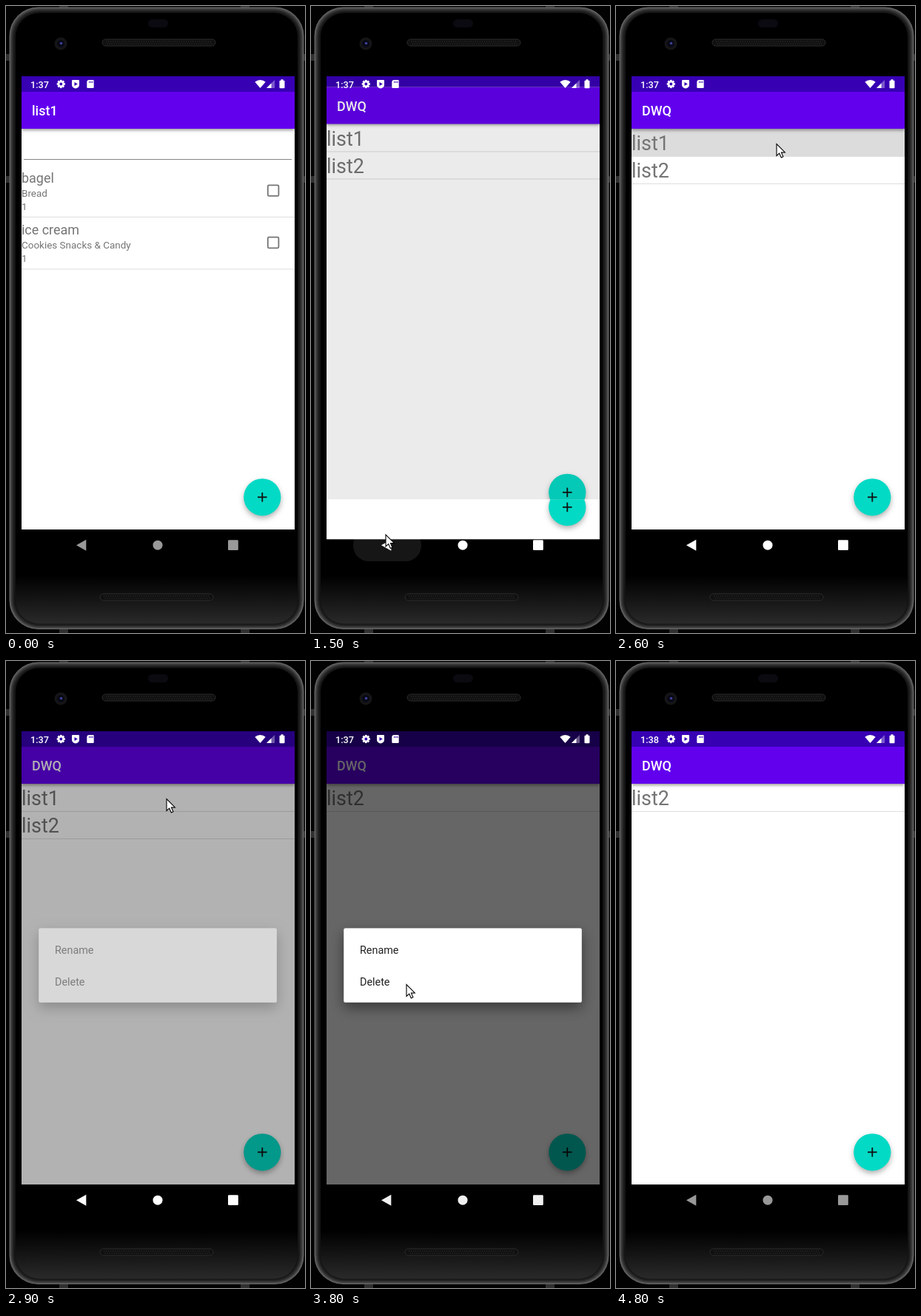
Animation of 404x848 px, one loop 5 s. Source, as an HTML page with a canvas:

```html
<!DOCTYPE html>
<html lang="en">
<head>
<meta charset="utf-8">
<title>Shopping list app</title>
<style>
  html, body { margin: 0; width: 100%; height: 100%; overflow: hidden; background: #000; }
  canvas { display: block; width: 404px; height: 848px; }
</style>
</head>
<body>
<canvas id="stage"></canvas>
<script>
const LOOP = 5000, STEP = 100;
const LEFT = 21, TOP = 95, WIDTH = 369, HEIGHT = 613;
const BAR_TOP = 116, BAR_BOTTOM = 166, ROW = 37;
const DP = WIDTH / 411;
const GREY = '#757575', LINE = '#dedede', STATUS_BLUE = '#3700b3';
const APP_NAME = 'DWQ';

const canvas = document.getElementById('stage');
const ctx = canvas.getContext('2d');
const dpr = window.devicePixelRatio || 1;
canvas.width = 404 * dpr;
canvas.height = 848 * dpr;

const ramp = (t, from, to) => Math.min(1, Math.max(0, (t - from) / (to - from)));
const smooth = u => u * u * (3 - 2 * u);
const grey = level => `rgb(${level},${level},${level})`;

function paint(fill, stroke, width = 1) {
  if (fill) { ctx.fillStyle = fill; ctx.fill(); }
  if (stroke) { ctx.strokeStyle = stroke; ctx.lineWidth = width; ctx.stroke(); }
}

function rect(x, y, w, h, color) {
  ctx.fillStyle = color;
  ctx.fillRect(x, y, w, h);
}

function roundRect(x, y, w, h, r, ...style) {
  ctx.beginPath();
  ctx.roundRect(x, y, w, h, r);
  paint(...style);
}

function circle(x, y, r, ...style) {
  ctx.beginPath();
  ctx.arc(x, y, r, 0, 2 * Math.PI);
  paint(...style);
}

function shape(points, ...style) {
  ctx.beginPath();
  points.forEach(([x, y]) => ctx.lineTo(x, y));
  ctx.closePath();
  paint(...style);
}

function text(str, x, y, sp, color, weight = 400) {
  ctx.font = `${weight} ${sp * DP}px Roboto, sans-serif`;
  ctx.fillStyle = color;
  ctx.fillText(str, x, y);
}

// Runs draw with saved state, optionally clipped to a box, moved down or faded.
function layer(draw, { clip, dy = 0, alpha = 1 } = {}) {
  ctx.save();
  if (clip) {
    ctx.beginPath();
    ctx.rect(...clip);
    ctx.clip();
  }
  ctx.translate(0, dy);
  ctx.globalAlpha = alpha;
  draw();
  ctx.restore();
}

function withShadow(opacity, blur, offset, draw) {
  ctx.save();
  ctx.shadowColor = `rgba(0,0,0,${opacity})`;
  ctx.shadowBlur = blur * dpr;
  ctx.shadowOffsetY = offset * dpr;
  draw();
  ctx.restore();
}

function speaker(x, y) {
  roundRect(x, y, 153, 9, 4.5, '#101010', '#2c2c2c');
  for (let i = 0; i < 96; i++) rect(x + 5 + i * 1.5, y + 2.5 + (i % 2) * 3, 1.2, 1.2, '#303030');
}

function drawPhone() {
  rect(0, 0, 404, 848, '#020203');
  for (const y of [65, 230]) rect(0, y, 404, 9, '#303030');
  for (const x of [72, 317]) rect(x, 0, 12, 848, '#303030');

  // The rim fades inward; the glass catches some light near the bottom.
  const rim = 11;
  for (let i = 0; i < rim; i++) {
    const shade = grey(Math.round(18 + 85 * (1 - i / rim) ** 2));
    roundRect(4.5 + i * 0.8, 1.5 + i * 0.8, 398 - i * 1.6, 841.5 - i * 1.6, 39 - i * 0.6, shade);
  }
  const glass = ctx.createLinearGradient(0, 770, 0, 836);
  glass.addColorStop(0, '#000');
  glass.addColorStop(1, '#2a2a2a');
  roundRect(13, 9.5, 381, 826, 32, glass);

  speaker(130, 45);
  speaker(127, 795);
  roundRect(192, 18, 27, 11, 5.5, '#0b0a11');
  circle(74, 51, 8.5, '#151517');
  circle(74, 51, 5, '#090916');
  circle(74.5, 50.5, 1.8, '#3a4296');
}

function statusIcons(time) {
  const middle = 105.5;
  text(time, 33, 110.5, 14.2, '#fff', 500);

  for (let i = 0; i < 4; i++) {
    ctx.save();
    ctx.translate(74.3, middle);
    ctx.rotate(i * Math.PI / 4);
    rect(-1.3, -5.6, 2.6, 11.2, '#fff');
    ctx.restore();
  }
  circle(74.3, middle, 4.2, '#fff');
  circle(74.3, middle, 1.9, STATUS_BLUE);

  roundRect(89, middle - 5.5, 10, 11.5, [1, 1, 5, 5], '#fff');
  shape([[92.5, 103], [96.8, middle], [92.5, 108]], STATUS_BLUE);

  roundRect(109.3, 100, 9.4, 11, [3, 1, 1, 1], '#fff');
  for (let i = 0; i < 3; i++) rect(112.2 + i * 2.1, 101.7, 1, 2.3, STATUS_BLUE);

  ctx.beginPath();
  ctx.moveTo(343.5, 111);
  ctx.arc(343.5, 111, 11, -2.28, -0.86);
  ctx.closePath();
  paint('#fff');

  const signal = size => [[352, 111], [352 + size, 111 - size], [352 + size, 111]];
  shape(signal(11), 'rgba(255,255,255,.35)');
  shape(signal(6.5), '#fff');
  roundRect(369.5, 100.8, 7, 10.4, 1, '#fff');
  rect(371.5, 99.3, 3, 2, '#fff');
}

function appWindow(title, body) {
  rect(LEFT, TOP, WIDTH, HEIGHT, '#fff');
  body();
  withShadow(0.4, 4, 1.5, () => rect(LEFT, BAR_TOP, WIDTH, BAR_BOTTOM - BAR_TOP, '#6200ee'));
  rect(LEFT, TOP, WIDTH, BAR_TOP - TOP, STATUS_BLUE);
  text(title, 35, 148, 20, '#fff', 500);

  const x = 346.3, y = 664.3, arm = 7 * DP;
  withShadow(0.3, 7, 3.5, () => circle(x, y, 28 * DP, '#03dac5'));
  rect(x - arm, y - DP, 2 * arm, 2 * DP, '#111');
  rect(x - DP, y - arm, 2 * DP, 2 * arm, '#111');
}

function groceryRow(name, category, y) {
  text(name, LEFT, y, 20, GREY);
  text(category, LEFT, y + 19, 15, GREY);
  text('1', LEFT, y + 37, 15, GREY);
  roundRect(353.8, y + 3.3, 14.6, 14.6, 1.5, null, GREY, 1.8);
  rect(LEFT, y + 46, WIDTH, 1, LINE);
}

function drawGroceries() {
  appWindow('list1', () => {
    rect(24, 207, 362, 1, '#858585');
    groceryRow('bagel', 'Bread', 239);
    groceryRow('ice cream', 'Cookies Snacks & Candy', 309.4);
  });
}

function drawLists(names, press) {
  appWindow(APP_NAME, () => {
    layer(() => circle(220, 187, 260 * press, '#dcdcdc'), { clip: [LEFT, BAR_BOTTOM, WIDTH, ROW + 0.5] });
    names.forEach((name, i) => {
      const y = BAR_BOTTOM + i * ROW;
      text(name, LEFT, y + 29, 30, GREY);
      rect(LEFT, y + ROW, WIDTH, 1, LINE);
    });
  });
}

function drawNav(t) {
  const press = ramp(t, 1100, 1300) - ramp(t, 1500, 1700);
  layer(() => roundRect(57, 708, 92, 43, 21, '#161616'), { alpha: press });
  const light = 0.6 + 0.4 * (ramp(t, 1000, 1300) - ramp(t, 3700, 4400));
  const color = grey(Math.round(255 * light));
  const y = 729.2;
  shape([[95, y], [108.3, y - 7.5], [108.3, y + 7.5]], color);
  circle(205, y, 6.5, color);
  roundRect(300, y - 7, 13.8, 13.8, 1.2, color);
}

function drawDialog(alpha) {
  layer(() => rect(LEFT, TOP, WIDTH, HEIGHT, '#000'), { alpha: alpha * 0.6 });
  const box = [44.3, 361.4, 321.5, 100.4];
  layer(() => {
    // Keep the shadow outside the box, so that it does not show through while fading.
    ctx.beginPath();
    ctx.rect(LEFT, TOP, WIDTH, HEIGHT);
    ctx.rect(...box);
    ctx.clip('evenodd');
    withShadow(0.45, 18, 7, () => roundRect(...box, 2, '#fff'));
  }, { alpha });
  layer(() => {
    roundRect(...box, 2, '#fff');
    text('Rename', 66, 396, 16, '#212121');
    text('Delete', 66, 439, 16, '#212121');
  }, { alpha });
}

const cursorMoves = [
  { from: 600, to: 1000, dx: -311, dy: 81 },
  { from: 1000, to: 1200, dx: 16, dy: -6 },
  { from: 1600, to: 2200, dx: 116, dy: -528.5 },
  { from: 3000, to: 3400, dx: -88, dy: 251 },
];

function drawCursor(t) {
  if (t < 600 || t > 4300) return;
  let x = 396, y = 640;
  for (const { from, to, dx, dy } of cursorMoves) {
    const u = ramp(t, from, to);
    x += dx * u;
    y += dy * u;
  }
  const arrow = [[0, 0], [0, 16], [3.7, 12.6], [6.3, 18.5], [8.9, 17.3], [6.4, 11.6], [11.3, 11.4]];
  shape(arrow.map(([dx, dy]) => [x + dx, y + dy]), '#fff', '#000', 1.1);
}

// The closing window slides down and is clipped away while the lists rise into place.
function drawScreen(t) {
  const u = ramp(t, 1350, 1650);
  const moved = smooth(u);
  const names = t < 3800 ? ['list1', 'list2'] : ['list2'];
  const press = t < 2900 ? ramp(t, 2200, 2500) : 0;
  layer(() => drawLists(names, press), { clip: [LEFT, TOP, WIDTH, HEIGHT], dy: -13 * (1 - moved) });
  layer(() => rect(LEFT, TOP, WIDTH, HEIGHT, '#000'), { alpha: 0.16 * (1 - moved) });

  const dy = 27 * moved;
  const visible = HEIGHT * (1 - u) ** 3.5;
  layer(drawGroceries, { clip: [LEFT, TOP + HEIGHT + dy - visible, WIDTH, visible], dy });
}

function render(t) {
  ctx.setTransform(dpr, 0, 0, dpr, 0, 0);
  drawPhone();
  drawNav(t);
  drawScreen(t);
  drawDialog(ramp(t, 2800, 3000) - ramp(t, 3800, 4000));
  statusIcons(t < 4000 ? '1:37' : '1:38');
  drawCursor(t);
}

const start = performance.now();
function tick() {
  const elapsed = (performance.now() - start) % LOOP;
  render(Math.floor(elapsed / STEP) * STEP);
  requestAnimationFrame(tick);
}
tick();
</script>
</body>
</html>
```
